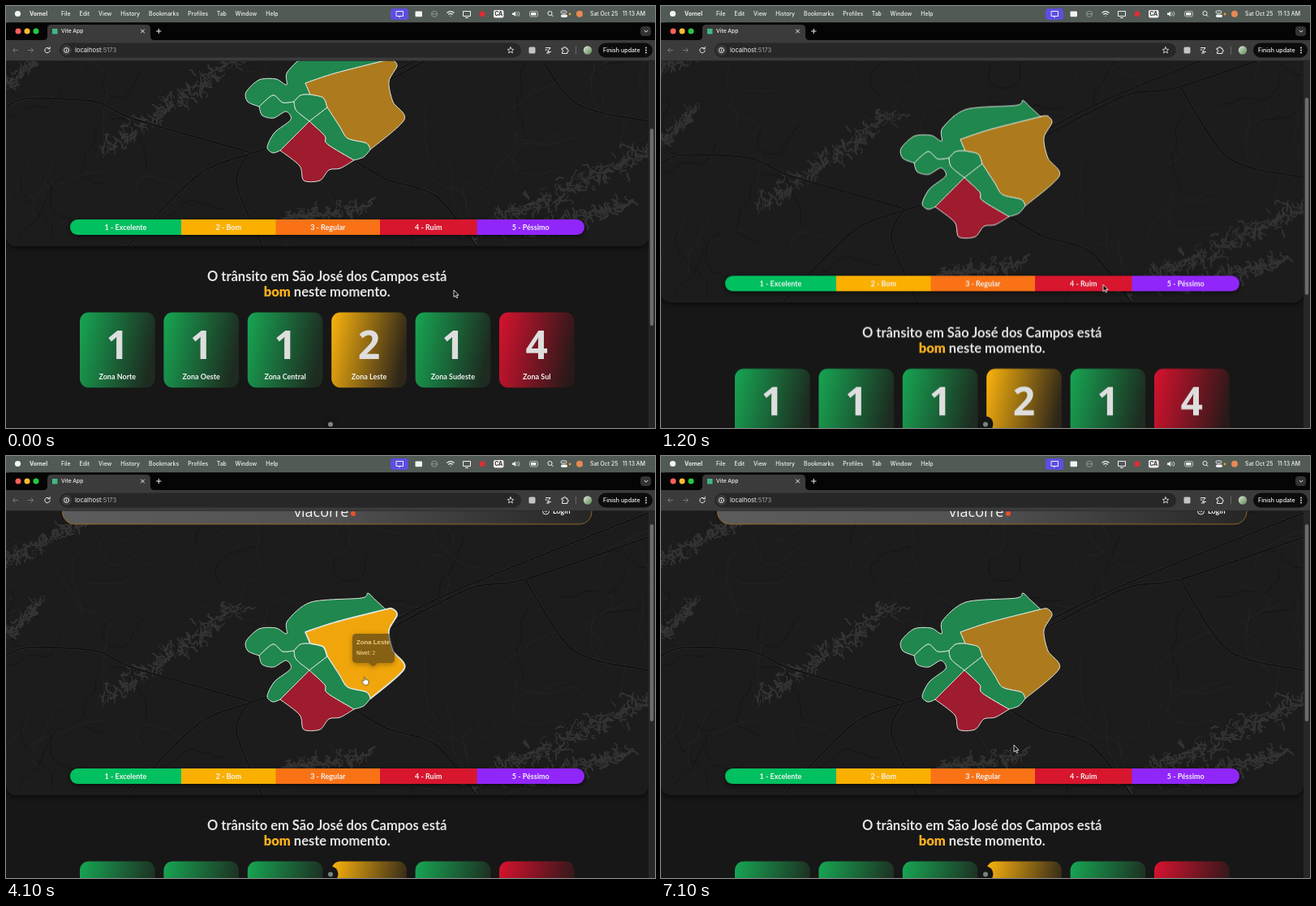
Animation, 800 px wide and 520 px high, one loop 8 s. Source, as an HTML page:

```html
<!DOCTYPE html>
<html lang="pt">
<head>
<meta charset="utf-8">
<title>Vite App</title>
<style>
  html, body { margin: 0; width: 100%; height: 100%; overflow: hidden; background: #000; }
  svg { display: block; width: 800px; height: 520px; }
  text { fill: #f2f2f2; white-space: pre; }
  .ui { font-family: Inter, sans-serif; font-size: 6.9px; font-weight: 500; }
  .site { font-family: Lato, sans-serif; font-weight: 700; font-size: 9px; }
  .title { font-size: 16.5px; fill: #e4e4e4; }
  .digit { font: 700 48px "Open Sans", sans-serif; fill: #dedede; }
  .tip { font: 700 7.8px "Liberation Sans", sans-serif; }
  .mid { text-anchor: middle; }

  .anim { animation: 8s infinite steps(5); }
  #page, #thumb { animation-name: scroll; }
  #page { --k: 1; }
  #thumb { --k: -.55; }
  @keyframes scroll {
    0% { transform: translateY(calc(-122px * var(--k))); }
    6.25% { transform: translateY(calc(-111px * var(--k))); }
    12.5% { transform: translateY(calc(-79.7px * var(--k))); }
    18.75% { transform: translateY(calc(-12px * var(--k))); animation-timing-function: steps(2); }
    21.25%, 100% { transform: translateY(0); }
  }
  #cursor { animation-name: move; }
  @keyframes move {
    0%, 6.25% { transform: translate(552px, 350px); }
    12.5% { transform: translate(549.5px, 348.5px); }
    18.75% { transform: translate(538px, 335px); }
    25%, 37.5% { transform: translate(452px, 262px); }
    42.5%, 47.5% { transform: translate(451.5px, 267px); }
    57.5%, 62.5% { transform: translate(404px, 293px); }
    73.75% { transform: translate(384px, 309px); }
    80% { transform: translate(397px, 318px); }
    88.75%, 100% { transform: translate(435px, 356px); }
  }
  .arrow, .hand, .zone { animation-timing-function: step-end; }
  .arrow { animation-name: arrow; }
  .hand { animation-name: hand; }
  @keyframes arrow { 0% { opacity: 1; } 22.5% { opacity: 0; } 83.75%, 100% { opacity: 1; } }
  @keyframes hand { 0% { opacity: 0; } 22.5% { opacity: 1; } 83.75%, 100% { opacity: 0; } }

  .zone { fill: var(--dim); stroke: #dfe6df; stroke-width: 1; stroke-linejoin: round; }
  #leste { animation-name: leste; }
  #sudeste { animation-name: sudeste; }
  #sul { animation-name: sul; }
  @keyframes leste { 22.5% { fill: var(--lit); stroke-width: 1.8; } 53.75%, 100% { fill: var(--dim); stroke-width: 1; } }
  @keyframes sudeste { 53.75% { fill: var(--lit); stroke-width: 1.8; } 65%, 100% { fill: var(--dim); stroke-width: 1; } }
  @keyframes sul { 65% { fill: var(--lit); stroke-width: 1.8; } 83.75%, 100% { fill: var(--dim); stroke-width: 1; } }

  #popup { animation-name: popup; animation-timing-function: steps(2); }
  @keyframes popup { 0%, 28.75% { opacity: 0; } 31.25%, 50% { opacity: 1; } 52.5%, 100% { opacity: 0; } }
</style>
</head>
<body>
<svg viewBox="0 0 800 520">
  <defs>
    <clipPath id="view"><rect y="67.5" width="800" height="453"/></clipPath>
    <clipPath id="mapBox"><rect y="-60" width="792" height="478" rx="12"/></clipPath>
    <clipPath id="pill"><rect x="79" y="385" width="634" height="19" rx="9.5"/></clipPath>
    <linearGradient id="bar">
      <stop stop-color="#5c5c5c"/><stop offset=".5" stop-color="#525252"/><stop offset="1" stop-color="#262626"/>
    </linearGradient>
    <linearGradient id="photo" x2="1" y2="1"><stop stop-color="#dfe6dc"/><stop offset="1" stop-color="#5c8a52"/></linearGradient>
    <filter id="soft" x="-30%" y="-30%" width="160%" height="180%">
      <feDropShadow dx="0" dy="2" stdDeviation="3" flood-opacity=".6"/>
    </filter>
  </defs>

  <g clip-path="url(#view)">
    <rect y="67" width="800" height="453" fill="#171717"/>
    <g id="page" class="anim">
      <g filter="url(#soft)"><rect y="-60" width="792" height="478" rx="12" fill="#1c1c1c"/></g>
      <g id="land" clip-path="url(#mapBox)" fill="none" stroke-linecap="round" stroke-linejoin="round"></g>
      <g id="zones"></g>
      <g filter="url(#soft)"><g id="legend" clip-path="url(#pill)"></g></g>
      <g id="legendText" class="site mid"></g>

      <rect x="69.5" y="30" width="652.5" height="54" rx="15" fill="url(#bar)" stroke="#8d6a22"/>
      <text x="355" y="75" style="font: 400 18px 'Open Sans', sans-serif">viacorre</text>
      <circle cx="428" cy="71" r="3" fill="#e8502a"/>
      <circle cx="665.5" cy="68" r="4" fill="none" stroke="#eee"/>
      <path d="M663 68h4m-1.5-1.5 1.5 1.5-1.5 1.5" fill="none" stroke="#eee" stroke-width=".8"/>
      <text class="site" x="674" y="71.3">Login</text>

      <g class="site mid">
        <text class="title" x="395.7" y="461">O trânsito em São José dos Campos está</text>
        <text class="title" x="395.7" y="480"><tspan fill="#fbb11c" font-weight="900">bom</tspan> neste momento.</text>
      </g>
      <g id="cards" class="mid"></g>

      <g id="popup" class="anim">
        <path filter="url(#soft)" fill="#1b1b1d"
          d="M432 219h42q5 0 5 5v26q0 5-5 5h-16l-5.500 4.500-5.500-4.500h-15q-5 0-5-5v-26q0-5 5-5z"/>
        <text class="tip" x="432" y="231.8">Zona Leste</text>
        <text class="tip" x="432" y="245" style="font-size: 6.5px">Nível: <tspan font-weight="400">2</tspan></text>
      </g>
    </g>
    <rect x="792" y="67" width="8" height="453" fill="#272727"/>
    <rect id="thumb" class="anim" x="793.8" y="84" width="4.4" height="243" rx="2.2" fill="#6c6c6c"/>
    <circle cx="400" cy="515" r="9.5" fill="#151515"/>
    <circle cx="400" cy="515.5" r="3" fill="#78857e"/>
  </g>

  <g class="ui">
    <rect width="800" height="20.5" fill="#515a55"/>
    <path d="M0 67.500V26q0-5.500 6-5.500h788q6 0 6 5.500v41.500z" fill="#050505"/>
    <path d="M46 42q5 0 5-5v-9q0-5 5-5h117q5 0 5 5v9q0 5 5 5z" fill="#3b3b3b"/>
    <rect y="42" width="800" height="25.5" fill="#3b3b3b"/>
    <g id="lights"></g>
    <rect x="57" y="28" width="6.5" height="6.5" fill="#41b883"/>
    <text x="68" y="33.4" font-size="6.7">Vite App</text>
    <rect x="782" y="25" width="13" height="12" rx="4" fill="#333"/>
    <rect x="66" y="45.5" width="569" height="18" rx="9" fill="#272727"/>
    <circle cx="74.5" cy="54.5" r="6.5" fill="#3b3b3b"/>
    <text x="85" y="57.2" font-size="7.6" font-weight="400">localhost<tspan fill="#a5a5a5">:5173</tspan></text>
    <rect x="730" y="45.5" width="67" height="18" rx="9" fill="#0c0c0c"/>
    <text x="736" y="57" font-size="7.1">Finish update</text>
    <path d="M789 51.500v7" stroke="#eee" stroke-width="1.8" stroke-linecap="round" stroke-dasharray="0 3"/>

    <g fill="none" stroke="#eee" stroke-linecap="round" stroke-linejoin="round">
      <path d="M166.500 29l4 4m0-4-4 4M185.500 31h5.500m-2.750-2.750v5.500M787 30.200l2 2 2-2"/>
      <path d="M14.500 54.500h-6m2.600-2.600-2.600 2.600 2.600 2.600M27.500 54.500h6m-2.600-2.600 2.600 2.600-2.600 2.600" stroke="#777"/>
      <path d="M53.500 52.500a3.200 3.200 0 1 0 .7 2.500m0-4.500v2.300h-2.300"/>
      <circle cx="74.5" cy="54.5" r="3"/><path d="M74.500 54.500v1.300m0-2.800v0"/>
      <path d="M622 50.700l1.100 2.500 2.700.2-2 1.800.6 2.700-2.400-1.500-2.400 1.500.6-2.700-2-1.800 2.700-.2z" stroke-width=".8"/>
      <path d="M665.500 51.500h5.500l-3.500 5h4m-5 1.500h3m-4.500-4h2"/>
      <path d="M685.500 52h2q0-1.700 1.200-1.700t1.200 1.700h2v2q1.500 0 1.500 1.200t-1.500 1.200v2.100h-6.400v-2.100q1.500 0 1.500-1.200t-1.500-1.200z"/>
      <path d="M702.500 50v9" stroke="#666"/>
    </g>
    <rect x="644.5" y="50.5" width="8" height="8" rx="1.5" fill="#c4c4c4"/>
    <circle cx="717" cy="54.5" r="5.2" fill="url(#photo)"/>

    <circle cx="14.5" cy="9.5" r="3.6" fill="#f4f4f4"/>
    <text x="29" y="12.2" font-weight="700">Vornel</text>
    <text id="menu" x="68" y="12.2"></text>
    <text x="720" y="12.2">Sat Oct 25</text>
    <text x="760" y="12.2">11:13 AM</text>
    <rect x="474" y="3" width="22" height="14" rx="3.5" fill="#5c4fe2"/>
    <g fill="none" stroke="#f2f2f2">
      <path d="M481 6.500h8.500v6h-8.500zM485 12.500v2M563.500 6.500h9v6h-9zM566 14.500h4"/>
      <path d="M524.500 9.800a3.600 3.600 0 1 0 7.200 0a3.600 3.600 0 1 0-7.200 0h7.200" stroke="#929894"/>
      <path d="M543.500 8.500q4.500-3.800 9 0M545.300 10.500q2.700-2.200 5.400 0M547.500 12.500h1" stroke-width="1.2"/>
      <path d="M629.500 7.500q1.800 2.300 0 4.600M631.500 6.500q3 3.300 0 6.600" stroke="#c5c9c6"/>
      <rect x="645.5" y="6.5" width="10" height="6.5" rx="1.8" stroke="#bbb"/>
      <circle cx="670.5" cy="9" r="2.6"/><path d="M672.500 11l2 2"/>
      <rect x="684" y="6" width="7" height="3" rx="1.5"/>
    </g>
    <g fill="#f2f2f2">
      <rect x="504.5" y="6.5" width="8.5" height="6.8" rx="1"/>
      <rect x="601" y="5" width="12.5" height="9.5" rx="2"/>
      <path d="M624 8.500h1.700l2.500-2v6.600l-2.500-2H624z"/>
      <rect x="647" y="8" width="6.5" height="3.5" rx=".6"/>
      <rect x="684" y="10.5" width="8" height="3.5" rx="1.7"/>
    </g>
    <circle cx="587" cy="9.7" r="3.5" fill="#d92f36"/>
    <circle cx="695" cy="10" r="1.4" fill="#f59a23"/>
    <circle cx="707" cy="9.7" r="4" fill="#e78a55"/>
    <text class="mid" x="607.2" y="12.3" style="fill: #333; font-weight: 700">CA</text>
  </g>

  <g id="cursor" class="anim">
    <path class="arrow anim" d="M0 0v8.600l2-1.800 1.400 3 1.300-.6-1.300-2.900h2.600z" fill="#0a0a0a" stroke="#fff" stroke-width=".8"/>
    <path class="hand anim" d="M-.8 5V1q0-1 .8-1t.8 1v2.500q1-.7 1.600.2 1-.5 1.500.4 1.100-.2 1.100 1v2q0 2.400-2.300 2.900h-2.500q-1.300-.6-3.200-3.700-.6-1.500.6-1.500z" fill="#fff" stroke="#1a1a1a" stroke-width=".6"/>
  </g>
</svg>

<script>
const byId = id => document.getElementById(id);

function add(parent, tag, attrs, text) {
  const el = document.createElementNS("http://www.w3.org/2000/svg", tag);
  for (const key in attrs) el.setAttribute(key, attrs[key]);
  if (text) el.textContent = text;
  parent.appendChild(el);
  return el;
}

let seed = 41;
const rand = () => (seed = (seed * 16807) % 2147483647) / 2147483647;
const jitter = size => (rand() - 0.5) * 2 * size;

// A wandering line: each step turns by up to `bend` radians
function wander(x, y, angle, steps, length, bend) {
  let d = `M${x} ${y}`;
  for (let i = 0; i < steps; i++) {
    angle += jitter(bend);
    d += `l${(Math.cos(angle) * length).toFixed(1)} ${(Math.sin(angle) * length).toFixed(1)}`;
  }
  return d;
}

// Smooth curve through points, continuing from the first one
function curve(points) {
  let d = "";
  for (let i = 0; i + 1 < points.length; i++) {
    const p = points[i], q = points[i + 1];
    const before = points[i - 1] || p, after = points[i + 2] || q;
    const ease = (a, b, c, sign) => a.map((v, k) => v + sign * (c[k] - b[k]) / 7);
    d += `C${ease(p, before, q, 1)} ${ease(q, p, after, -1)} ${q}`;
  }
  return d;
}

const land = byId("land");
const stroke = (d, color, width) => add(land, "path", { d, stroke: color, "stroke-width": width });

// Minor roads
for (let i = 0; i < 90; i++) {
  const d = wander(rand() * 792, rand() * 420, rand() * 6.3, 24, 4, 0.5);
  stroke(d, i % 3 ? "#262626" : "#131313", 0.8);
}

// Branching reservoirs along a straight spine
function reservoir(x0, y0, x1, y1, spread) {
  const count = Math.hypot(x1 - x0, y1 - y0) * 0.8;
  for (let i = 0; i < count; i++) {
    const p = i / count, off = rand() * spread;
    const x = x0 + (x1 - x0) * p + jitter(off), y = y0 + (y1 - y0) * p + jitter(off);
    stroke(wander(x, y, rand() * 6.3, 5, 2, 1.2), "#343434", 0.8 + rand() * 1.4);
  }
}
reservoir(125, 300, 288, 182, 15);
reservoir(0, 222, 45, 178, 9);
reservoir(0, 130, 110, 70, 12);
reservoir(345, 384, 445, 372, 14);
reservoir(575, 402, 792, 300, 20);
reservoir(640, 400, 770, 365, 12);

// Highways
const highways = [
  [[150, 418], [240, 328], [330, 293], [445, 222], [556, 165], [792, 70]],
  [[0, 246], [28, 236], [110, 240], [160, 262], [300, 302]],
  [[448, 226], [570, 164], [640, 152], [792, 100]],
  [[429, 312], [470, 336], [530, 356], [580, 418]],
  [[640, 152], [700, 240], [792, 264]],
  [[300, 302], [284, 340], [316, 418]]
];
for (const points of highways) {
  const d = "M" + points[0] + curve(points);
  stroke(d, "#2c2c2c", 2.8);
  stroke(d, "#0f0f0f", 1.7);
}

// Zones share their borders: junctions by letter, borders by letter pair
const junctions = {
  a: [312, 246], b: [468, 189], c: [369, 217], d: [375, 231], e: [355, 240],
  f: [396, 247], g: [374, 264], h: [338, 300], k: [449, 299], m: [429, 312]
};
const borders = {
  ab: [[298, 240], [296, 228], [312, 213], [333, 212], [346, 219], [347, 203], [376, 180], [438, 175], [446, 169], [455, 177]],
  bc: [[405, 205]],
  de: [[363, 232]],
  ea: [[341, 241], [329, 232]],
  df: [[391, 235]],
  ge: [[358, 251]],
  ah: [[316, 257], [330, 260], [345, 252], [351, 262], [331, 278], [322, 296], [329, 303]],
  bk: [[476, 188], [482, 196], [472, 215], [477, 240], [491, 262]],
  fk: [[411, 270], [421, 285], [444, 291]],
  km: [[441, 308]],
  gm: [[393, 282], [396, 292]],
  mh: [[412, 322], [398, 324], [387, 337], [367, 337], [362, 319]]
};
function outline(loop) {
  let d = "M" + junctions[loop[0]];
  for (let i = 0; i + 1 < loop.length; i++) {
    const from = loop[i], to = loop[i + 1];
    const inner = borders[from + to] || [...(borders[to + from] || [])].reverse();
    d += curve([junctions[from], ...inner, junctions[to]]);
  }
  return d + "z";
}

const tones = {
  green: ["#20874e", "#07bf61"],
  amber: ["#ad7b1d", "#f0a60b"],
  red: ["#9f1b2e", "#d0142d"]
};
const zones = [
  ["norte", "green", "abcdea"], ["oeste", "green", "aegha"], ["central", "green", "dfged"],
  ["sul", "red", "gmhg"], ["leste", "amber", "bkfdcb"], ["sudeste", "green", "fkmgf"]
];
for (const [id, tone, loop] of zones) {
  const [dim, lit] = tones[tone];
  add(byId("zones"), "path", { id, d: outline(loop), class: "zone anim", style: `--dim:${dim};--lit:${lit}` });
}

const levels = [
  ["Excelente", 79, "#05c061"], ["Bom", 216, "#fbb003"], ["Regular", 332.5, "#f97316"],
  ["Ruim", 461, "#d8132f"], ["Péssimo", 580.5, "#9127fb"]
];
levels.forEach(([name, x, fill], i) => {
  const end = i < 4 ? levels[i + 1][1] : 713;
  add(byId("legend"), "rect", { x, y: 384, width: end - x + 0.5, height: 21, fill });
  add(byId("legendText"), "text", { x: (x + end) / 2, y: 397.6 }, `${i + 1} - ${name}`);
});

const fades = { 1: ["#17a653", "#1d2b20"], 2: ["#fcb40d", "#2e2619"], 4: ["#d8122f", "#2b1919"] };
for (const level in fades) {
  const grad = add(document.querySelector("defs"), "linearGradient", { id: "fade" + level, x2: 1.04, y2: 0.22 });
  fades[level].forEach((color, i) => add(grad, "stop", { offset: i, "stop-color": color }));
}
const cards = [["Norte", 1], ["Oeste", 1], ["Central", 1], ["Leste", 2], ["Sudeste", 1], ["Sul", 4]];
cards.forEach(([name, level], i) => {
  const x = 91 + i * 103.4, group = byId("cards");
  add(group, "rect", { x, y: 499.5, width: 92.7, height: 92.7, rx: 11, fill: `url(#fade${level})` });
  add(group, "text", { class: "digit", x: x + 46.3, y: 556.5 }, String(level));
  add(group, "text", { class: "site", x: x + 46.3, y: 582 }, "Zona " + name);
});

["#fe5f57", "#febc2e", "#28c840"].forEach((fill, i) =>
  add(byId("lights"), "circle", { cx: 15 + i * 11, cy: 31, r: 3.5, fill }));

["File", "Edit", "View", "History", "Bookmarks", "Profiles", "Tab", "Window", "Help"].forEach((label, i) =>
  add(byId("menu"), "tspan", { dx: i ? 11 : 0 }, label));
</script>
</body>
</html>
```
